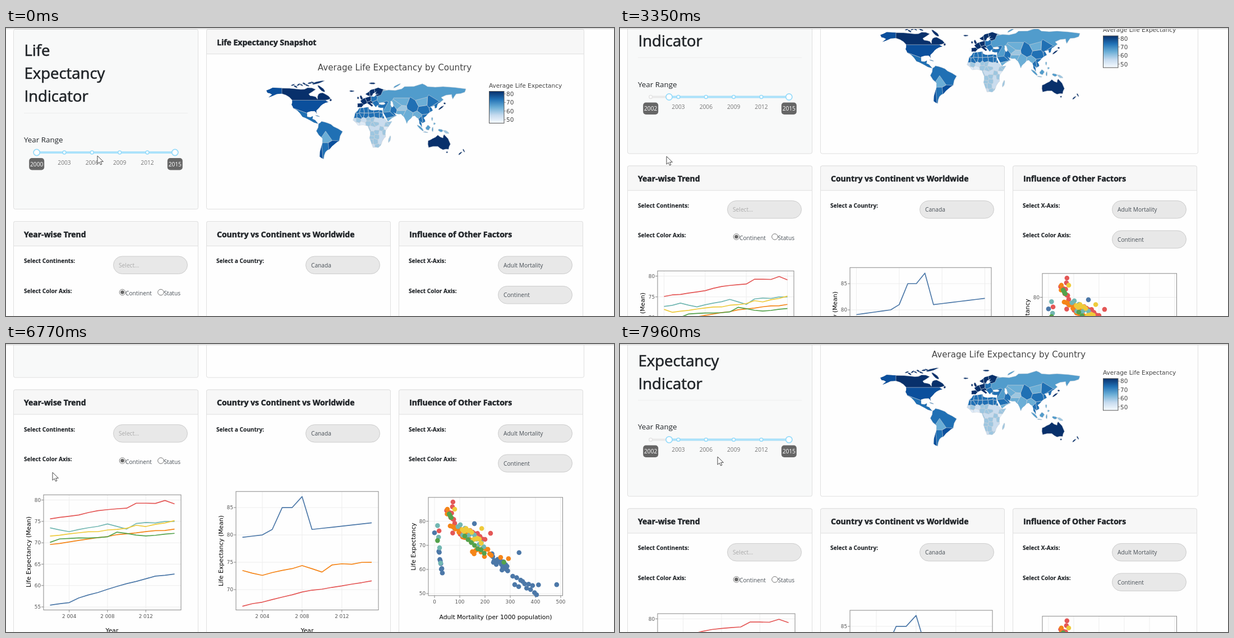
Recreate the animation shown at these times as an HTML page. Size 1084 by 516 pixels, loop 8 s.

```html
<!DOCTYPE html>
<html lang="en">
<head>
<meta charset="utf-8">
<title>Life Expectancy Indicator</title>
<style>
html, body { margin: 0; width: 100%; height: 100%; overflow: hidden; background: #fefefe; }
svg { display: block; width: 1084px; height: 516px; }
text { font-family: "Open Sans", "Noto Sans", sans-serif; font-size: 10.2px; fill: #495057; }
.plot text { font-family: "DejaVu Sans", Verdana, sans-serif; fill: #444; }
text.h1 { font-size: 27.5px; fill: #212529; stroke: #212529; stroke-width: .65; }
text.h2 { font-size: 14px; font-weight: 700; fill: #212529; stroke: #212529; stroke-width: .5; }
text.label { font-size: 10.1px; font-weight: 700; fill: #212529; stroke: #212529; stroke-width: .15; }
text.tick { font-size: 8.8px; fill: #555; }
text.axis { font-size: 10.8px; fill: #000; text-anchor: middle; }
.mid { text-anchor: middle; }
.panel { fill: #f8f9f9; stroke: #dfdfdf; }
.card { fill: #fefefe; stroke: #dfdfdf; }
.head { fill: #f7f7f7; stroke: #dfdfdf; }
.pill { fill: #e8e8e8; stroke: #ccc; }
.grid { stroke: #ededed; fill: none; }
.box { stroke: #888; fill: none; }
.line { fill: none; stroke-width: 1.7; stroke-linejoin: round; }
#map path { stroke: #d0d4d8; stroke-width: .6; stroke-linejoin: round; }
</style>
</head>
<body>
<svg viewBox="0 0 1084 516">
  <defs>
    <clipPath id="view"><rect y="2" width="1084" height="514"/></clipPath>
    <linearGradient id="blues" x2="0" y2="1">
      <stop stop-color="#08306b"/><stop offset=".25" stop-color="#2171b5"/>
      <stop offset=".5" stop-color="#6baed6"/><stop offset=".75" stop-color="#c6dbef"/>
      <stop offset="1" stop-color="#f7fbff"/>
    </linearGradient>
  </defs>
  <rect width="1084" height="1" fill="#ececec"/>
  <rect y="1" width="1084" height="1" fill="#cfcfcf"/>
  <g clip-path="url(#view)"><g id="page">
    <g id="cards"></g>
    <g id="slider"></g>
    <g id="map"></g>
    <g id="legend" class="plot"></g>
    <g id="before" class="plot"></g>
    <g id="after" class="plot"></g>
    <g id="scatter" class="plot"></g>
  </g></g>
  <circle id="halo" fill="#fff200" opacity=".65"/>
  <path id="arrow" d="M0 0V14.2L3.3 11.2L5.6 16L7.9 15L5.7 10.3H10.4Z" fill="#fff" stroke="#333" stroke-width=".9"/>
  <path id="beam" d="M-2.5-6.5H-.5L0-6L.5-6.5H2.5M0-6V6M-2.5 6.5H-.5L0 6L.5 6.5H2.5" fill="none" stroke="#222"/>
</svg>
<script>
const $ = id => document.getElementById(id);
const text = (x, y, s, cls = '', more = '') => `<text x="${x}" y="${y}" class="${cls}" ${more}>${s}</text>`;
const rect = (x, y, w, h, cls, r = 0) => `<rect x="${x}" y="${y}" width="${w}" height="${h}" rx="${r}" class="${cls}"/>`;
const dot = (x, y, r, more) => `<circle cx="${x}" cy="${y}" r="${r}" ${more}/>`;
const seg = (x1, y1, x2, y2, cls) => `<path d="M${x1} ${y1}L${x2} ${y2}" class="${cls}"/>`;
const pairs = s => s.split(',').map(p => p.trim().split(' ').map(Number));
const range = (from, to, by, fn) => {
  const out = [];
  for (let v = from; v <= to; v += by) out.push(fn(v));
  return out;
};
let seed = 7;
const rand = () => (seed = seed * 16807 % 2147483647) / 2147483647;
const jitter = size => (rand() * 2 - 1) * size;

// Page layout
const card = (x, y, w, h, title) => rect(x, y, w, h, 'card', 3) +
  `<path class="head" d="M${x} ${y + 44}V${y + 3}q0-3 3-3H${x + w - 3}q3 0 3 3V${y + 44}Z"/>` +
  text(x + 18.5, y + 28, title, 'h2');
const field = (x, y, s, color = '#495057') => rect(x, y, 132, 31.5, 'pill', 15.75) +
  text(x + 9.5, y + 19.7, s, '', `style="fill:${color}"`);
const radio = (x, s, on) => dot(x, 473.5, 5.3, 'fill="#fff" stroke="#767676"') +
  (on ? dot(x, 473.5, 3.3, 'fill="#666"') : '') + text(x + 5.5, 479, s);

$('cards').innerHTML = rect(13.5, 2.5, 329, 322, 'panel', 3) +
  ['Life', 'Expectancy', 'Indicator'].map((s, i) => text(32.5, 50 + 41.2 * i, s, 'h1')).join('') +
  seg(32, 152.5, 324, 152.5, 'grid') +
  text(32, 205, 'Year Range', '', 'style="font-size:13.4px;fill:#212529"') +
  card(357.5, 2.5, 673, 322, 'Life Expectancy Snapshot') +
  card(13.5, 346.5, 329, 490, 'Year-wise Trend') +
  card(357.5, 346.5, 328, 490, 'Country vs Continent vs Worldwide') +
  card(700.5, 346.5, 328, 490, 'Influence of Other Factors') +
  text(32, 421, 'Select Continents:', 'label') + text(32, 474.5, 'Select Color Axis:', 'label') +
  text(375, 421, 'Select a Country:', 'label') +
  text(718, 421, 'Select X-Axis:', 'label') + text(718, 474.5, 'Select Color Axis:', 'label') +
  field(191.5, 409, 'Select...', '#aaa') + field(534.5, 409, 'Canada') +
  field(877.5, 409, 'Adult Mortality') + field(877.5, 462.5, 'Continent') +
  radio(207.5, 'Continent', true) + radio(276, 'Status');

// Range slider
const yearX = n => 54.7 + 16.44 * n;
const badge = (x, s) => `<rect x="${x - 13.5}" y="233" width="27" height="21.5" rx="5" fill="#666"/>` +
  text(x, 247.6, s, 'mid', 'style="fill:#fff"');
function slider(first, glow) {
  const x = yearX(first), end = yearX(15);
  let out = `<rect x="54" y="221" width="248" height="4" rx="2" fill="#e9e9e9"/>
    <rect x="${x}" y="221" width="${end - x}" height="4" fill="#abe2fb"/>`;
  for (let n = 0; n <= 15; n += 3) {
    out += dot(yearX(n), 223, 2.9, `fill="#fff" stroke-width="1.5" stroke="${n < first ? '#e4e4e4' : '#96dbfa'}"`);
    if (n % 15) out += text(yearX(n), 244.5, 2000 + n, 'mid', 'style="fill:#777"');
  }
  if (glow) out += dot(x, 223, 7.5, 'fill="#57c5f7" opacity=".6"');
  const handle = 'fill="#fff" stroke-width="1.7" stroke=';
  $('slider').innerHTML = out + dot(x, 223, 5.6, handle + (glow ? '"#57c5f7"' : '"#96dbfa"')) +
    dot(end, 223, 5.6, handle + '"#96dbfa"') + badge(54.7, 2000 + first) + badge(end, 2015);
}

// World map in degrees: rough coasts, divided into the cells around each country's centre
const shade = { k: '#08306b', a: '#0b4f9c', b: '#2070b4', c: '#519ccc', d: '#6baed6', e: '#9dc6e0', f: '#c9dcee', g: '#deeaf6', sea: '#fefefe' };
const outline = pts => 'M' + pts.map(([lon, lat]) =>
  `${(636 + 1.022 * lon).toFixed(1)} ${(179.5 - 1.022 * lat).toFixed(1)}`).join('L') + 'Z';
const area = (tone, pts) => `<path d="${outline(pts)}" fill="${shade[tone]}"/>`;

function rough(pts) {
  return pts.flatMap(([x, y], i) => {
    const [u, v] = pts[(i + 1) % pts.length];
    const bend = Math.hypot(u - x, v - y) > 5 ? jitter(.1) : 0;
    return [[x, y], [(x + u) / 2 + (v - y) * bend, (y + v) / 2 - (u - x) * bend]];
  });
}
function cell(site, sites) {
  let poly = [[-200, -90], [200, -90], [200, 90], [-200, 90]];
  for (const other of sites) {
    if (other === site) continue;
    const side = p => Math.hypot(p[0] - other[0], p[1] - other[1]) ** 2 - Math.hypot(p[0] - site[0], p[1] - site[1]) ** 2;
    poly = poly.flatMap((p, i) => {
      const q = poly[(i + 1) % poly.length], a = side(p), b = side(q), f = a / (a - b);
      const cut = [p[0] + (q[0] - p[0]) * f, p[1] + (q[1] - p[1]) * f];
      return [...(a >= 0 ? [p] : []), ...(a * b < 0 ? [cut] : [])];
    });
  }
  return poly;
}
let lands = 0;
function continent(base, coast, sites) {
  const edge = rough(pairs(coast)), id = 'land' + lands++;
  const cells = sites.filter(s => s[2] !== base).map(s => area(s[2], cell(s, sites))).join('');
  return area(base, edge) + `<clipPath id="${id}"><path d="${outline(edge)}"/></clipPath><g clip-path="url(#${id})">${cells}</g>`;
}
const centres = groups => Object.entries(groups).flatMap(([tone, s]) => pairs(s).map(p => [...p, tone]));
function island(tone, lon, lat, rx, ry, tilt = 0) {
  const a = tilt * Math.PI / 180;
  return area(tone, range(0, 9, 1, i => {
    const w = i * Math.PI / 5, k = 1 + jitter(.25);
    const x = rx * k * Math.cos(w), y = ry * k * Math.sin(w);
    return [lon + x * Math.cos(a) - y * Math.sin(a), lat + x * Math.sin(a) + y * Math.cos(a)];
  }));
}
const africa = range(-16, 50, 8, lon => range(-33, 36, 8, lat => {
  const dry = lat > 20 ? 'b' : lat > 12 ? 'eff' : lat > -14 ? 'ffge' : 'eff';
  return [lon + jitter(2.5), lat + jitter(2.5), dry[Math.floor(rand() * dry.length)]];
})).flat();

$('map').innerHTML =
  continent('k', '-168 66,-157 71,-128 70,-108 68,-96 71,-82 68,-94 60,-92 57,-82 55,-79 51,-77 60,-70 62,-64 59,-56 52,-65 49,-60 46,-70 42,-76 36,-81 31,-80 25,-84 30,-97 28,-97 20,-91 19,-87 21,-88 16,-83 14,-78 8,-85 10,-96 16,-105 20,-114 31,-121 35,-124 41,-123 49,-134 58,-150 60,-164 54,-158 59,-166 62',
    centres({ k: '-100 60', a: '-182 60,-100 38', b: '-107 19' })) +
  continent('b', '-77 8,-72 12,-61 9,-51 3,-35 -6,-41 -22,-48 -27,-58 -37,-65 -42,-68 -54,-75 -50,-72 -32,-70 -18,-81 -5',
    centres({ a: '-78 -35,-55 -33', b: '-54 -10', d: '-64 -17', ' b': '-74 4,-66 7,-76 -9,-64 -34' })
      .map(([x, y, tone]) => [x, y, tone.trim()])) +
  continent('c', '5 60,14 67,27 71,41 67,33 65,45 67,68 69,73 73,104 78,113 73,140 73,180 69,178 63,163 60,157 51,155 59,137 54,141 50,131 43,129 36,126 35,125 40,118 38,122 31,110 21,106 18,109 12,104 9,100 13,103 2,99 8,97 17,91 22,87 21,80 14,77 8,72 20,67 25,57 26,50 30,56 25,59 22,44 12,35 29,36 36,27 37,26 41,23 37,19 42,13 45,18 40,16 38,8 44,3 42,-2 37,-9 37,-9 43,-1 44,-4 48,8 54,20 55,24 59,30 60,22 60,25 65,18 61,16 56,12 56,8 58',
    centres({
      k: '8 62,16 63,26 64,-4 40,2 47,10 51,13 43',
      b: '19 51,22 44,35 39,53 32,45 23,88 38,105 32,122 45,127 37,101 15,107 16',
      c: '31 50,44 34,40 58,67 60,100 57,130 58,160 64',
      d: '67 46,62 39,103 46,78 22,66 28,47 14,96 20', e: '66 34'
    })) +
  continent('f', '-6 35,10 37,11 33,20 31,34 31,38 17,43 11,51 12,40 -4,40 -15,35 -21,33 -27,27 -34,18 -34,12 -17,13 -6,9 4,-8 5,-17 14,-13 27', africa
    .map(([x, y, tone]) => [x, y, tone])) +
  continent('k', '114 -22,115 -34,131 -32,140 -38,150 -37,153 -28,142 -11,140 -17,131 -12,122 -18', []) +
  range(0, 8, 1, i => island('k', -122 + 5 * i, 72 + .6 * i + rand() * 4, 3.5, 1.3, jitter(30))).join('') +
  [
    ['k', -72, 69, 8, 2.5, -40], ['k', -78, 80, 10, 2, 15], ['k', -56, 49, 2, 2], ['k', -19, 65, 4.5, 1.3],
    ['k', -2.5, 54, 2, 4, 20], ['k', -8, 53, 1.6, 2], ['k', 17, 78.5, 6, 1.3], ['c', 59, 74, 7, 1.2, 30],
    ['k', 137, 36, 5.5, 1.3, 40], ['k', 143, 43.5, 2, 1.3], ['e', 47, -19, 1.8, 6, -12], ['b', -79, 21.5, 4, .7, -18],
    ['c', 101, 0, 7, 1.5, -45], ['c', 110, -7, 5, .7, -8], ['c', 114, 1, 3.8, 3.8], ['c', 122, -2, 1.3, 3.5],
    ['c', 136, -4, 4.5, 2.3, -25], ['e', 145, -6.5, 5, 2, -30], ['d', 121, 16, 1.3, 3], ['d', 125, 8, 1.8, 1.8],
    ['k', 147, -42, 1.6, 1.3], ['k', 176, -39, 3.3, 1.1, -60], ['k', 170, -44, 4.3, 1.1, 42],
    ['sea', 34, 43.3, 6, 1.7], ['sea', 51, 42, 2, 5, 15]
  ].map(row => island(...row)).join('');

$('legend').innerHTML = text(693, 76, 'Average Life Expectancy by Country', 'mid', 'style="font-size:15.1px"') +
  text(861, 106.5, 'Average Life Expectancy', '', 'style="font-size:10.55px"') +
  '<rect x="861.5" y="113.5" width="26.5" height="57" fill="url(#blues)" stroke="#555"/>' +
  [80, 70, 60, 50].map((v, i) => seg(888, 118 + 15.4 * i, 891, 118 + 15.4 * i, 'box') +
    text(892, 122 + 15.4 * i, v, '', 'style="font-size:10.5px"')).join('');

// Charts
const hue = { blue: '#4c78a8', orange: '#f58518', red: '#e45756', teal: '#72b7b2', green: '#54a24b', yellow: '#eeca3b' };
function frame(x0, y0, x1, y1, xs, ys) {
  let out = '';
  for (const [x, s] of xs)
    out += seg(x, y0, x, y1, 'grid') + seg(x, y1, x, y1 + 4, 'box') + text(x, y1 + 14.5, s, 'tick mid');
  for (const [y, s] of ys)
    out += seg(x0, y, x1, y, 'grid') + seg(x0 - 4, y, x0, y, 'box') +
      text(x0 - 5, y + 3.2, s, 'tick', 'text-anchor="end"');
  return out + rect(x0, y0, x1 - x0, y1 - y0, 'box');
}
const upright = (x, y, s) => text(0, 0, s, 'axis', `transform="translate(${x} ${y}) rotate(-90)"`);

// Turning points (years since 2000, mean life expectancy), filled in year by year
function yearly(keys, wobble = .12) {
  const pts = pairs(keys);
  return range(0, 15, 1, n => {
    const i = Math.max(1, pts.findIndex(p => p[0] >= n));
    const [x, y] = pts[i - 1], [u, v] = pts[i];
    return y + (v - y) * (n - x) / (u - x) + (n === x || n === u ? 0 : jitter(wobble));
  });
}
const trend = {
  red: yearly('0 75.1,5 76.5,7 77.5,10 78.1,11 79.25,13 79.2,14 79.9,15 79.1'),
  teal: yearly('0 72.7,2 73.5,4 72.6,8 74.4,10 73.2,11 74.5,15 75'),
  yellow: yearly('0 72,1 71.3,10 73.4,11 74.1,12 73.8,15 75.2'),
  orange: yearly('0 68.6,2 69.6,9 71.9,15 73.2'),
  green: yearly('0 69.5,2 70.1,3 70.9,8 71.4,9 72.5,12 71.6,15 72.2'),
  blue: yearly('0 54.6,4 56,5 57.1,9 59.8,13 62.2,15 62.7')
};
const versus = {
  blue: yearly('0 79.1,4 80,5 81,6 85,7 85,8 87,9 81,15 82.2', 0),
  orange: trend.teal,
  red: yearly('0 66.4,4 67.7,9 69.9,15 71.6')
};
function lines(data, first, x0, x1, top, topY, scale) {
  return Object.entries(data).map(([name, values]) => {
    const v = values.slice(first), dx = (x1 - x0) / (v.length - 1);
    const pts = v.map((n, i) => (x0 + dx * i).toFixed(1) + ',' + (topY + (top - n) * scale).toFixed(1));
    return `<polyline points="${pts.join(' ')}" class="line" stroke="${hue[name]}"/>`;
  }).join('');
}
function yearCharts(first, x1, x2, wide, kA, kB) {
  const marks = (a, b) => range(first ? 4 : 0, 15, first ? 4 : 5,
    n => [a + (b - a) * (n - first) / (15 - first), '2 ' + String(n).padStart(3, '0')]);
  const rows = (from, top, y, k) => range(from, top, 5, v => [y + (top - v) * k, v]);
  return frame(67, 534.7, 310 + wide, 741, marks(78.5, x1), rows(55, 80, 544, kA)) +
    lines(trend, first, 78.5, x1, 80, 544, kA) +
    frame(410, 528.7, 662 + wide, 741, marks(421.5, x2), rows(70, 85, 557.5, kB)) +
    lines(versus, first, 421.5, x2, 85, 557.5, kB) +
    upright(43.5, 637, 'Life Expectancy (Mean)') + upright(386.5, 635, 'Life Expectancy (Mean)') +
    text(189, 781.5, 'Year', 'axis') + text(537, 781.5, 'Year', 'axis');
}
$('before').innerHTML = yearCharts(0, 298.5, 650.5, 0, 7.45, 9.4);
$('after').innerHTML = yearCharts(2, 300.5, 652, 2, 7.66, 9.8);

// A swarm of n dots spread along a line from (m0, life0) to (m1, life1)
const mortX = m => 764 + .45 * m;
const lifeY = v => 582 + 4.32 * (80 - v);
const swarm = (name, n, m0, life0, m1, life1, spread) => range(0, n - 1, 1, i => {
  const f = n > 1 ? i / (n - 1) : 0;
  return dot(mortX(m0 + (m1 - m0) * f), lifeY(life0 + (life1 - life0) * f + jitter(spread)), 4.3, `fill="${hue[name]}"`);
}).join('');
$('scatter').innerHTML =
  frame(753, 539.3, 992.5, 715.3, range(0, 500, 100, v => [mortX(v), v]), range(50, 80, 10, v => [lifeY(v), v])) +
  swarm('blue', 3, 0, 75.2, 158, 79, 0) + swarm('blue', 8, 17, 67.5, 31, 58.2, 1) +
  swarm('blue', 24, 225, 65, 290, 60, 2) + swarm('blue', 14, 310, 57, 412, 52, 3) +
  swarm('blue', 2, 335, 67, 484, 53.7, 0) +
  swarm('red', 9, 48, 83, 80, 81, 2) + swarm('red', 2, 73, 88, 71, 86, 0) +
  swarm('red', 14, 72, 77, 200, 72, 2) + swarm('red', 2, 18, 76, 222, 75, 0) +
  swarm('orange', 2, 51, 85, 50, 83, 0) + swarm('orange', 13, 62, 78, 145, 73, 1.5) +
  swarm('orange', 12, 150, 68.5, 225, 66.5, 2) + swarm('orange', 2, 262, 65, 293, 64.5, 0) +
  swarm('teal', 4, 12, 79, 24, 63.5, 1) + swarm('teal', 12, 93, 77.5, 195, 70, 2) +
  swarm('yellow', 11, 110, 76.5, 185, 72, 1.5) + swarm('yellow', 2, 80, 85, 187, 77, 0) +
  swarm('green', 3, 58, 83, 66, 81.5, 0) + swarm('green', 7, 120, 74, 197, 66.5, .5) +
  swarm('green', 2, 12, 72, 275, 63, 0) +
  upright(730, 627.5, 'Life Expectancy') +
  text(873, 757, 'Adult Mortality (per 1000 population)', 'axis');

// Motion: [from, to, pictures, target, easing power], held between pictures
const scrolls = [[3200, 3490, 5, 179, 1.15], [4500, 4590, 2, 268, 1], [6770, 7200, 6, 179, 1.8],
  [7430, 7500, 2, 89, 1], [7960, 8040, 2, 0, 1.25]];
const across = [[60, 230, 3, 90, 1], [530, 1150, 9, 54, 1], [1500, 2180, 10, 83, 1], [7570, 7890, 5, 174, 1]];
const down = [[60, 230, 3, 239, 1], [530, 1150, 9, 224, 1], [1500, 2180, 10, 230, 1], [7570, 7890, 5, 202, 1]];
const halos = [[1330, 1500, 2, 10.5, .3], [2720, 2800, 2, 0, 1]];
const stepped = (t, from, to, n) =>
  t < from ? 0 : Math.min(1, (Math.floor((t - from) / (to - from) * (n - 1) + 1e-6) + 1) / n);
const follow = (t, value, moves) => moves.reduce((v, [from, to, n, target, power]) =>
  v + (target - v) * stepped(t, from, to, n) ** power, value);
const show = (id, on) => $(id).style.display = on ? '' : 'none';

let state = '';
function draw(t) {
  const x = follow(t, 163, across), y = follow(t, 229, down);
  $('page').setAttribute('transform', `translate(0 ${-follow(t, 0, scrolls)})`);
  const reading = (t >= 3490 && t < 4820) || (t >= 7200 && t < 7430);
  for (const id of ['arrow', 'beam']) $(id).setAttribute('transform', `translate(${x} ${y})`);
  show('arrow', !reading);
  show('beam', reading);
  const halo = $('halo');
  halo.setAttribute('cx', x);
  halo.setAttribute('cy', y + .5);
  halo.setAttribute('r', follow(t, 0, halos));
  const drag = stepped(t, 1500, 2180, 10);
  const first = drag >= .85 ? 2 : drag >= .3 ? 1 : 0;
  const glow = t >= 1150 && t < 2800;
  if (state !== first + ' ' + glow) {
    state = first + ' ' + glow;
    slider(first, glow);
  }
  show('before', t < 4990);
  show('after', t >= 4990);
}
const start = performance.now();
function tick() {
  draw((performance.now() - start) % 8000);
  requestAnimationFrame(tick);
}
tick();
</script>
</body>
</html>
```
